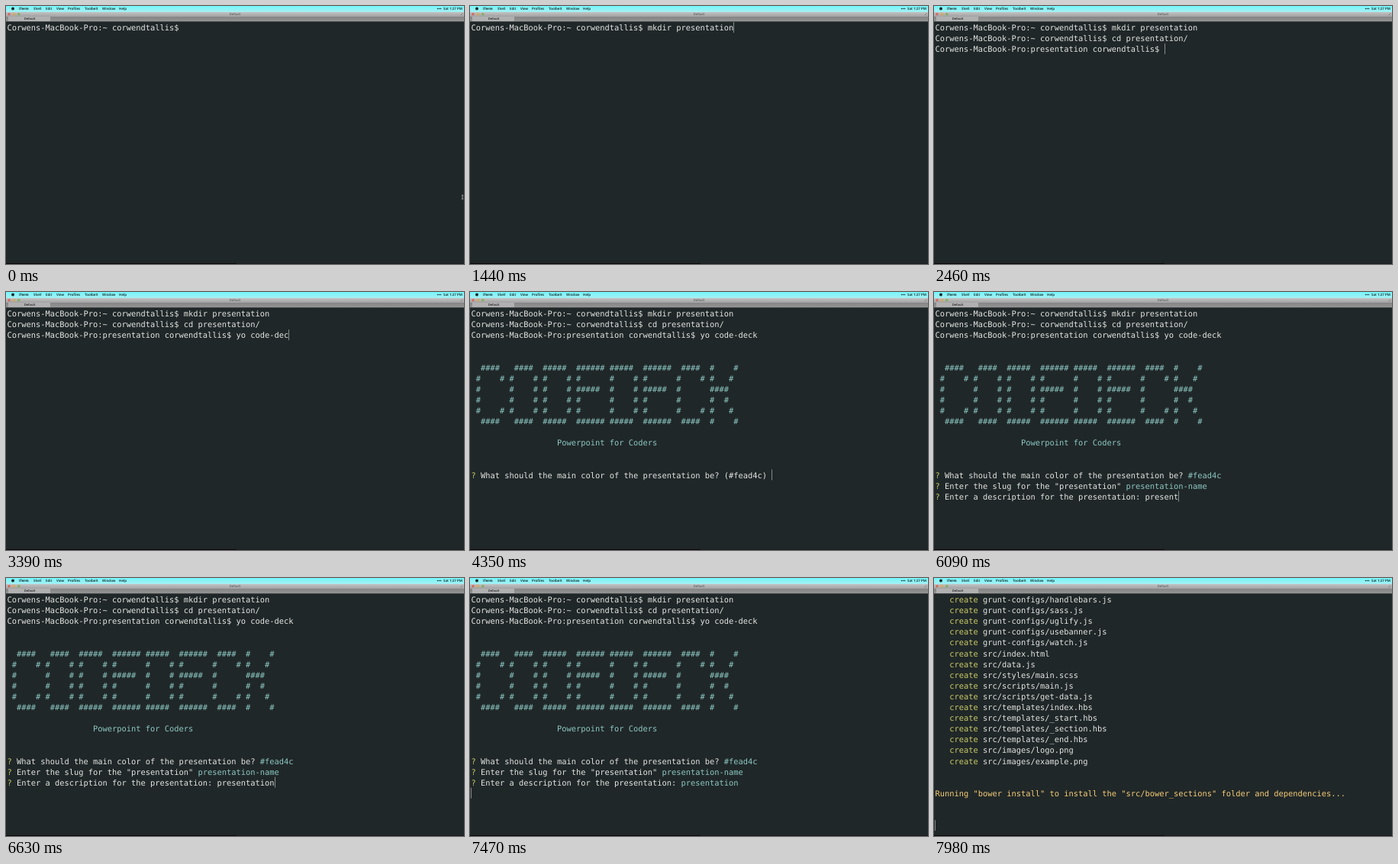
These frames come from a looping animation (600x338 px, 8000 ms). An HTML page with a canvas:

```html
<!DOCTYPE html>
<html lang="en">
<head>
<meta charset="utf-8">
<title>Terminal</title>
<style>
html, body { margin: 0; width: 100%; height: 100%; overflow: hidden; background: #202728; }
canvas { display: block; width: 600px; height: 338px; }
</style>
</head>
<body>
<canvas id="stage"></canvas>
<script>
const W = 600, H = 338, LOOP = 8000;
const LEFT = 1.5, TOP = 21, CELL = 6.25, ROW = 14.1;
const MONO = '10.4px "DejaVu Sans Mono", monospace';
const UI = '"Open Sans", "Noto Sans", sans-serif';
const WHITE = '#e3e5e2', CYAN = '#8cc8c4', GREEN = '#c9cb67', YELLOW = '#f5cd78';

const canvas = document.getElementById('stage');
const ctx = canvas.getContext('2d');
const dpr = window.devicePixelRatio || 1;
canvas.width = W * dpr;
canvas.height = H * dpr;
ctx.scale(dpr, dpr);
if ('textRendering' in ctx) ctx.textRendering = 'geometricPrecision';

const HOST = 'Corwens-MacBook-Pro', USER = 'corwendtallis';
const prompt = dir => `${HOST}:${dir} ${USER}$ `;

// Banner letters, six rows each
const GLYPHS = {
  C: [' ####', '#    #', '#', '#', '#    #', ' ####'],
  O: [' ####', '#    #', '#    #', '#    #', '#    #', ' ####'],
  D: ['#####', '#    #', '#    #', '#    #', '#    #', '#####'],
  E: ['######', '#', '#####', '#', '#', '######'],
  K: ['#    #', '#   #', '####', '#  #', '#   #', '#    #']
};
const banner = [0, 1, 2, 3, 4, 5].map(r =>
  ' ' + [...'CODEDECK'].map(c => GLYPHS[c][r].padEnd(7)).join('').trimEnd());

const files = [
  ...['handlebars', 'sass', 'uglify', 'usebanner', 'watch'].map(n => `grunt-configs/${n}.js`),
  'src/index.html', 'src/data.js', 'src/styles/main.scss',
  'src/scripts/main.js', 'src/scripts/get-data.js',
  ...['index', '_start', '_section', '_end'].map(n => `src/templates/${n}.hbs`),
  'src/images/logo.png', 'src/images/example.png'
];

// Part of the text entered by time t, one key every `gap` ms
function typed(text, t, start, gap) {
  return text.slice(0, Math.max(0, Math.floor((t - start) / gap) + 1));
}

const white = s => [s, WHITE];

function question(text, hint, answer, done) {
  return [['? ', GREEN], white(text + ' '), done ? [answer, CYAN] : white(hint)];
}

function finalScreen() {
  return [
    ...files.map(f => [['   create ', GREEN], white(f)]),
    [], [],
    [['Running "bower install" to install the "src/bower_sections" folder and dependencies...', YELLOW]],
    [], [], []
  ];
}

// Lines on screen at time t; the caret sits at the end of the last one
function screenAt(t) {
  if (t >= 7500) return finalScreen();

  const mkdir = typed('mkdir ', t, 90, 90) + typed('presentation', t, 720, 61);
  const lines = [[white(prompt('~') + mkdir)]];
  if (t < 1590) return lines;

  const cd = t >= 2265 ? 'cd presentation/' : typed('cd pr', t, 1740, 100);
  lines.push([white(prompt('~') + cd)]);
  if (t < 2460) return lines;

  lines.push([white(prompt('presentation') + typed('yo code-deck', t, 2670, 70))]);
  if (t < 3600) return lines;
  if (t < 3870) return [...lines, []];

  lines.push([], [], ...banner.map(s => [[s, CYAN]]), [],
    [[' '.repeat(18) + 'Powerpoint for Coders', CYAN]], [], []);
  lines.push(question('What should the main color of the presentation be?',
    '(#fead4c) ', '#fead4c', t >= 4560));
  if (t < 4560) return lines;

  lines.push(question('Enter the slug for the "presentation"',
    '(presentation-name) ', 'presentation-name', t >= 5040));
  if (t < 5040) return lines;

  const text = typed('presentation', t, 5550, 85);
  lines.push(question('Enter a description for the presentation:', text, text, t >= 7200));
  if (t >= 7200) lines.push([]);
  return lines;
}

function rect(x, y, w, h, fill) {
  ctx.fillStyle = fill;
  ctx.fillRect(x, y, w, h);
}

function dot(x, y, r, fill) {
  ctx.fillStyle = fill;
  ctx.beginPath();
  ctx.arc(x, y, r, 0, Math.PI * 2);
  ctx.fill();
}

function gradient(y, h, from, to) {
  const g = ctx.createLinearGradient(0, y, 0, y + h);
  g.addColorStop(0, from);
  g.addColorStop(1, to);
  return g;
}

function label(text, x, y, size, fill, align = 'left', weight = 400) {
  ctx.font = `${weight} ${size}px ${UI}`;
  ctx.textAlign = align;
  ctx.fillStyle = fill;
  ctx.fillText(text, x, y);
}

function drawChrome() {
  rect(0, 0, W, 8, gradient(0, 8, '#72f7fb', '#a6eff2'));
  dot(9, 3.5, 2, '#17292b');
  label('iTerm', 17, 5.2, 4.5, '#102022', 'left', 700);
  const menus = { Shell: 36, Edit: 52, View: 66, Profiles: 81, Toolbelt: 103, Window: 126, Help: 148 };
  for (const name in menus) label(name, menus[name], 5.2, 4.5, '#102022', 'left', 600);
  for (let i = 0; i < 3; i++) dot(565.5 + i * 2, 3.6, 0.75, '#102022');
  label('Sat 1:27 PM', 598, 5.2, 4.5, '#102022', 'right', 600);

  rect(0, 8, W, 6, gradient(8, 6, '#c2c2c2', '#a2a2a2'));
  ['#d4685c', '#d9a84f', '#82ae64'].forEach((c, i) => dot(4 + i * 6.4, 10.7, 1.7, c));
  label('Default', 300, 12.3, 4.2, '#444', 'center');
  ctx.strokeStyle = '#555';
  ctx.lineWidth = 0.6;
  ctx.beginPath();
  ctx.moveTo(595.5, 12.3);
  ctx.lineTo(598.3, 9.5);
  ctx.stroke();

  rect(0, 14, W, 6.5, gradient(14, 6, '#858585', '#939393'));
  rect(3, 14, 55, 6, '#b0b0b0');
  label('Default', 31, 18.4, 4.1, '#222', 'center', 600);
  rect(0, 20, W, 1, '#454848');
}

function drawLine(parts, row) {
  let col = 0;
  for (const [text, fill] of parts) {
    ctx.fillStyle = fill;
    for (const ch of text) {
      if (ch !== ' ') ctx.fillText(ch, LEFT + col * CELL, TOP + 11 + row * ROW);
      col++;
    }
  }
  return col;
}

function drawPointer() {
  rect(597.6, 248, 0.8, 5, '#c4c8c8');
  rect(596.8, 247.6, 2.4, 0.7, '#c4c8c8');
  rect(596.8, 252.6, 2.4, 0.7, '#c4c8c8');
}

function draw(t) {
  rect(0, 0, W, H, '#202728');
  drawChrome();

  ctx.font = MONO;
  ctx.textAlign = 'left';
  const lines = screenAt(t);
  let end = 0;
  lines.forEach((line, row) => { end = drawLine(line, row); });
  if (t >= 90) {
    rect(Math.round(LEFT + end * CELL) - (end ? 0 : 1), TOP + (lines.length - 1) * ROW, 1, 14, '#858b8a');
  } else {
    drawPointer();
  }

  rect(0, 337, W, 1, '#191d1e');
  rect(0, 337, 302, 1, '#0a0506');
}

function tick(now) {
  draw(now % LOOP);
  requestAnimationFrame(tick);
}
draw(0);
requestAnimationFrame(tick);
</script>
</body>
</html>
```
